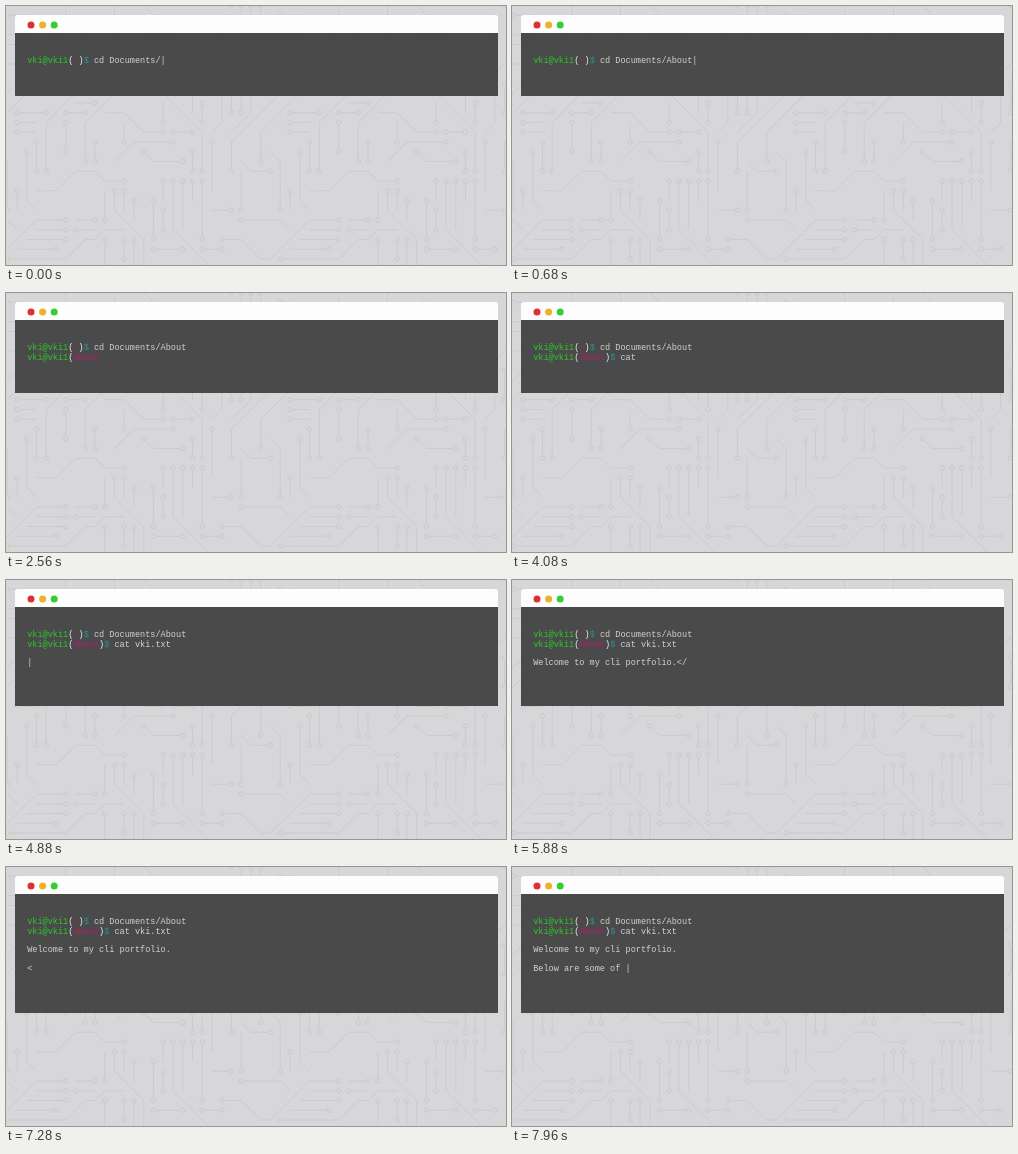
These frames come from a looping animation (500x259 px, 8000 ms). An HTML page:

```html
<!DOCTYPE html>
<html lang="en">
<head>
<meta charset="utf-8">
<title>Terminal portfolio</title>
<style>
  html, body { margin: 0; width: 100%; height: 100%; overflow: hidden; background: #d7d7d9; }
  svg, #panel { position: absolute; left: 0; top: 0; }
  #panel { left: 9px; top: 27px; width: 470.8px; padding: 23.9px 0 29.44px 12.2px;
    background: rgba(59, 59, 59, .9); color: #d2d2d2; white-space: pre;
    font: 8.55px/9.66px "Liberation Mono", "Courier New", monospace; }
  p { margin: 1em 0; }
  .user { color: #2bc92b; }
  .paren { color: #eee; }
  .path { color: #b81a68; }
  .sign { color: #2a8f98; }
</style>
</head>
<body>
<svg width="500" height="259" viewBox="0 0 500 259">
  <defs>
    <marker id="ring" viewBox="-4 -4 8 8" markerWidth="8" markerHeight="8" markerUnits="userSpaceOnUse">
      <circle r="2.2" fill="#d7d7d9" stroke="#cbcbcd"/>
    </marker>
    <g id="tile" fill="none" stroke="#cbcbcd"></g>
  </defs>
  <use href="#tile" x="-273"/><use href="#tile"/><use href="#tile" x="273"/>
  <path d="M9 27V12q0-3 3-3H489q3 0 3 3V27z" fill="#fdfdfd"/>
  <circle cx="25" cy="18.9" r="3.5" fill="#dc2f36"/>
  <circle cx="36.6" cy="18.9" r="3.5" fill="#f0b02c"/>
  <circle cx="48.2" cy="18.9" r="3.5" fill="#31cf31"/>
</svg>
<div id="panel"><div id="prompt"></div><p id="body"></p></div>
<script>
const $ = id => document.getElementById(id);

// Circuit board: traces walk a wrapping grid in 45-degree turns and never cross
const GRID = 9.75, COLUMNS = 28, ROWS = 27;
const RIGHT = 0, DOWN = 2, LEFT = 4, UP = 6;
const used = new Set();
const cell = (x, y) => (x + COLUMNS * 2) % COLUMNS + ',' + y;
let seed = 11;
const random = () => (seed = seed * 16807 % 2147483647) / 2147483647;

function addTrace(x, y, direction) {
  if (used.has(cell(x, y))) return;
  const points = [];
  const visit = () => {
    used.add(cell(x, y));
    points.push([x * GRID + 1.25, y * GRID - .5]);
  };
  visit();
  const length = 5 + random() * 8;
  for (let step = 0, heading = direction; step < length; step++) {
    if (step > 1 && random() < .3) {
      heading = heading === direction ? direction + (random() < .5 ? 1 : -1) : direction;
    }
    const dx = Math.round(Math.cos(heading * Math.PI / 4));
    const dy = Math.round(Math.sin(heading * Math.PI / 4));
    const crossing = used.has(cell(x + dx, y)) && used.has(cell(x, y + dy));
    if (crossing || used.has(cell(x + dx, y + dy)) || y + dy < 0 || y + dy > ROWS) break;
    x += dx;
    y += dy;
    visit();
  }
  if (points.length < 3) return;
  const end = random() < .4 ? 'marker-end="url(#ring)"' : '';
  $('tile').innerHTML += `<path marker-start="url(#ring)" ${end} d="M${points.join('L')}"/>`;
}

[[17, 14, LEFT], [18, 16, LEFT], [4, 17, UP], [8, 16, UP], [20, 17, UP], [23, 17, UP],
 [17, 18, DOWN], [18, 18, DOWN], [19, 18, DOWN], [20, 18, DOWN], [11, 19, DOWN], [12, 19, DOWN],
 [1, 11, RIGHT], [1, 12, RIGHT], [1, 13, RIGHT], [6, 11, RIGHT], [15, 25, RIGHT], [16, 24, RIGHT],
 [6, 22, LEFT], [6, 23, LEFT], [6, 24, LEFT], [5, 25, LEFT]
].forEach(start => addTrace(...start));
for (let i = 0; i < 400; i++) {
  addTrace(Math.floor(random() * COLUMNS), Math.floor(random() * ROWS), 2 * Math.floor(random() * 4));
}

// Typed pieces: style, text, first tick, characters on that tick
const SPEED = 3, BODY_START = 49;
const promptPieces = [
  ['user', 'vki@vki1', -99],
  ['paren', '(', -99],
  ['path', '~', -99],
  ['paren', ')', -99],
  ['sign', '$', -99],
  ['', ' cd Documents/', -99],
  ['', 'About', 4, 1],
  ['', '\n', 9],
  ['user', 'vki@vki1', 13, 1],
  ['paren', '(', 19],
  ['path', 'About', 24, 1],
  ['paren', ')', 29],
  ['sign', '$', 35],
  ['', ' cat', 38, 2],
  ['', ' vki.txt', 45]
];
const bodyPieces = [
  ['', 'Welcome to my cli portfolio.', 50],
  ['', '\n\n', 60],
  ['', 'Below are some of ', 75]
];
// Half-typed markup shows for one tick, as does the cursor
const fragments = { 1: '<', 9: '<', 16: '</', 47: '<', 59: '</', 73: '<' };
const cursorTicks = new Set([0, 7, 13, 19, 25, 30, 35, 40, 49, 55, 61, 74, 80]);

const typed = (pieces, tick) => pieces
  .map(([style, text, start, first = SPEED]) =>
    [style, text.slice(0, Math.max(0, first + SPEED * (tick - start)))])
  .filter(([, text]) => text);

function render(tick) {
  const inBody = tick >= BODY_START;
  const tail = fragments[tick] || (cursorTicks.has(tick) ? '|' : '');
  const prompt = typed(promptPieces, tick);
  if (!inBody) prompt[prompt.length - 1][1] += tail;

  $('prompt').innerHTML = prompt.map(([style, text]) =>
    `<span class="${style}">${text.replace(/</g, '&lt;')}</span>`).join('');
  $('body').hidden = !inBody;
  $('body').textContent = (typed(bodyPieces, tick).map(piece => piece[1]).join('') + tail).trimEnd();
}

let lastTick = -1;
function frame() {
  const time = performance.now() % 8000;
  const tick = Math.floor((Math.floor(time / 40) + 1) * 40 / 100);
  if (tick !== lastTick) render(lastTick = tick);
  requestAnimationFrame(frame);
}
frame();
</script>
</body>
</html>
```
